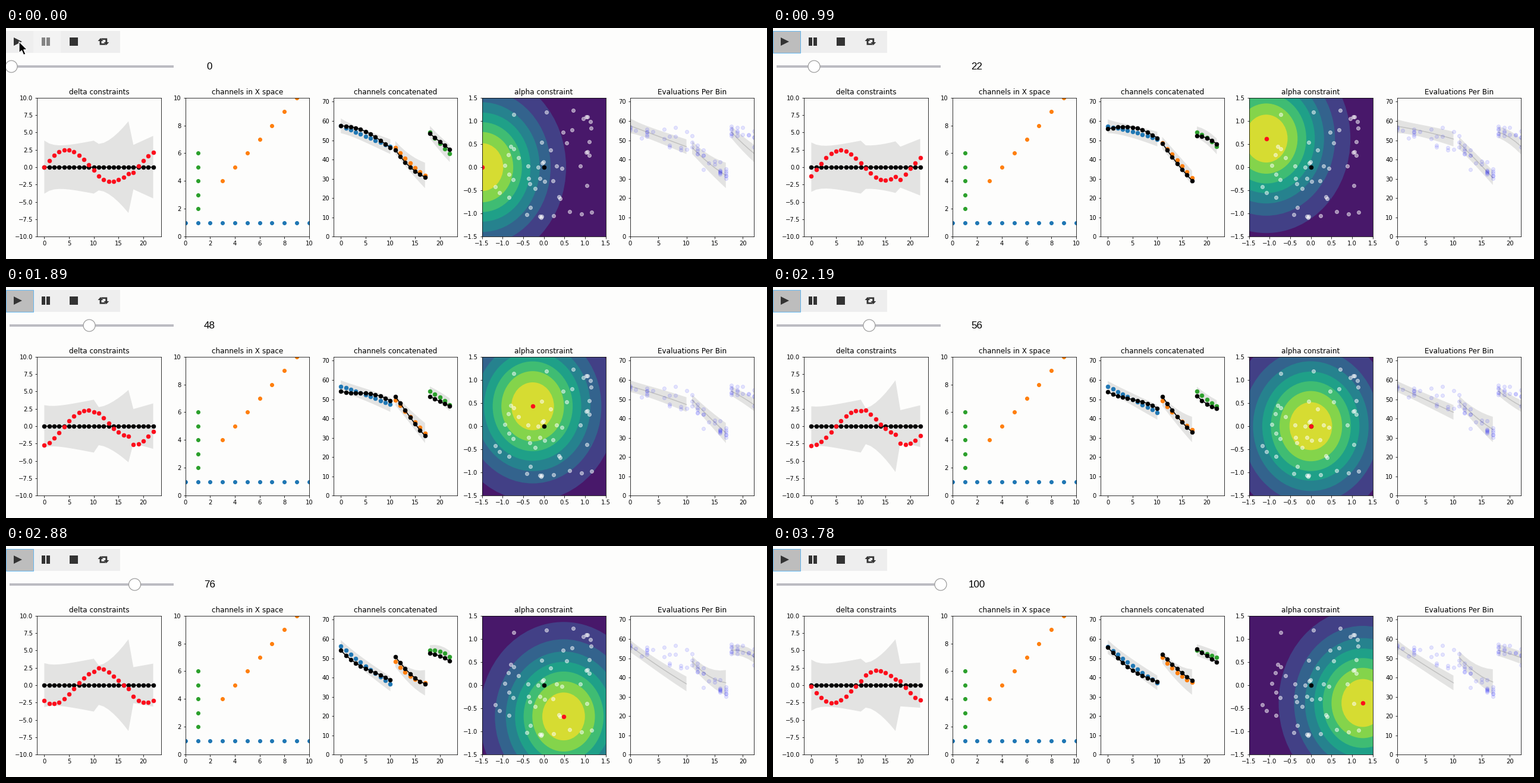
Write a matplotlib script that moves like this. It is 1280x390 px and loops after 3810 ms.

```python
import numpy as np
import matplotlib.pyplot as plt
from matplotlib.animation import FuncAnimation
from matplotlib.patches import Circle, FancyBboxPatch, Polygon, Rectangle

W, H, DPI = 1280, 390, 72
FRAMES, STEP_MS = 127, 30
PAGE, INK, RED = "#fdfdfc", "#333333", "#fc0d1b"
PRESS_FRAME = 2
TIP_START, TIP_END = 9, 25

BINS = np.arange(23)
CHANNELS = [slice(0, 11), slice(11, 18), slice(18, 23)]
COLORS = ["tab:blue", "tab:orange", "tab:green"]

# Playback timing: slider readout and path position at a few frames.
KEY_FRAMES = [0, 4, 14, 17, 33, 53, 73, 96, 126]
KEY_VALUES = [0, 0, 7.7, 10, 22, 40, 56, 76, 100]
KEY_PATH = [0, 0, 0, .02, .14, .32, .50, .66, .92]


def path_point(t):
    return -1.5 + 3 * t, .8 * np.sin(2 * np.pi * t)


def channel_means(a, b):
    """Each channel is a line from start to end with a parabolic bend."""
    lines = [(56.6 - .6 * a, 43.2 - 2.3 * a + 8 * b, .8 * b),
             (49.1 + 1.9 * a + 2.5 * b, 34.3 + 1.7 * a - 3.2 * b, 1.8 * b - .9),
             (54.2, 46.5 + 2.2 * a + 7 * b * b, 3.5 * b * b - .4)]
    means = []
    for (start, end, bend), part in zip(lines, CHANNELS):
        u = np.linspace(0, 1, len(BINS[part]))
        means.append(start + (end - start) * u + 4 * bend * u * (1 - u))
    return np.concatenate(means)


def channel_widths(a, b):
    """Half width of the uncertainty, widest at the end of the second channel."""
    u1, u2, u3 = (np.linspace(0, 1, len(BINS[p])) for p in CHANNELS)
    far = abs(a)
    spike = 1 - 1.9 * max(b, 0) ** 2
    return np.concatenate([
        2.4 + (.45 + .65 * far) * np.exp(-5 * u1) + 1.4 * u1,
        2.6 + .5 * far * (1 - u2) + 4 * spike * u2 ** 1.5,
        2.3 + .6 * far + (.7 - .4 * a) * u3])


def wave(t):
    """Travelling sine whose amplitude fades along each channel."""
    fade = [(2.8, 2.2), (2.5, 1.6), (2.7, 2.4)]
    amp = [np.linspace(*ends, len(BINS[p])) for ends, p in zip(fade, CHANNELS)]
    return np.concatenate(amp) * np.sin((BINS - 10 * t) / 3)


def random_evaluations(rng):
    """Noisy values around a falling line for each group of bins."""
    points = []
    for first, last, count, top, slope, spread in [
            (0, 4, 11, 56, -1, 2), (6, 10, 11, 48, -.8, 4.5),
            (11, 17, 28, 47.5, -2.6, 2.5), (18, 22, 18, 55, -.7, 2)]:
        bins = rng.integers(first, last + 1, count)
        noise = rng.normal(0, spread, count)
        points.append(np.c_[bins, top + slope * (bins - first) + noise])
    return np.concatenate(points)


def outline(x, low, high):
    return np.column_stack([np.r_[x, x[::-1]], np.r_[low, high[::-1]]])


fig = plt.figure(figsize=(W / DPI, H / DPI), dpi=DPI, facecolor=PAGE)
rng = np.random.default_rng(4)


def panel(k, title, xlim, ylim, xticks, yticks):
    left, top, bottom = 52.3 + 249.4 * k, 117.6, 352.2
    ax = fig.add_axes([left / W, 1 - bottom / H, 208.2 / W, (bottom - top) / H],
                      facecolor=PAGE)
    ax.set(xlim=xlim, ylim=ylim, xticks=xticks, yticks=yticks)
    ax.set_title(title, fontsize=12)
    ax.tick_params(labelsize=10)
    return ax


def add_band(ax):
    return ax.add_patch(Polygon([(0, 0), (0, 0)], fc="black", alpha=.1, lw=0))


def add_dots(ax, color, style="o"):
    return ax.plot([], [], style, color=color, ms=6.5, lw=1.5)[0]


fives, tens = range(0, 21, 5), range(0, 71, 10)
halves = np.arange(-1.5, 1.6, .5)
ax_delta = panel(0, "delta constraints", (-1.45, 23.55), (-10, 10),
                 fives, np.arange(-10, 10.1, 2.5))
ax_space = panel(1, "channels in X space", (0, 10), (0, 10),
                 range(0, 11, 2), range(0, 11, 2))
ax_cat = panel(2, "channels concatenated", (-1.45, 23.55), (0, 72.1), fives, tens)
ax_alpha = panel(3, "alpha constraint", (-1.5, 1.5), (-1.5, 1.5), halves, halves)
ax_eval = panel(4, "Evaluations Per Bin", (0, 22), (0, 72.1), fives, tens)

delta_band = add_band(ax_delta)
add_dots(ax_delta, "black", "o-").set_data(BINS, 0 * BINS)
delta_dots = add_dots(ax_delta, RED)

ax_space.scatter(range(11), [1] * 11, color=COLORS[0])
ax_space.scatter(range(3, 10), range(4, 11), color=COLORS[1])
ax_space.scatter([1] * 5, range(2, 7), color=COLORS[2])

cat_bands = [add_band(ax_cat) for _ in CHANNELS]
cat_dots = [add_dots(ax_cat, c) for c in COLORS]
cat_lines = [add_dots(ax_cat, "black", "o-") for _ in CHANNELS]

# Filled contours of a unit Gaussian are discs around its centre.
shades = list(plt.get_cmap("viridis")((np.arange(8) + .5) / 8))
shades[-1] = "#d6dc32"
ax_alpha.set_facecolor(shades[0])
rings = [ax_alpha.add_patch(Circle((0, 0), np.sqrt(-2 * np.log(k / 8)),
                                   fc=shades[k], lw=0))
         for k in range(1, 8)]
ax_alpha.scatter(rng.uniform(-1.28, 1.2, 52), rng.uniform(-1.25, 1.3, 52),
                 color="white", alpha=.5, zorder=2)
add_dots(ax_alpha, "black").set_data([0], [0])
alpha_dot = add_dots(ax_alpha, RED)

eval_bands = [add_band(ax_eval) for _ in CHANNELS]
eval_lines = [ax_eval.plot([], [], color="black", alpha=.15, lw=1.5)[0]
              for _ in CHANNELS]
ax_eval.scatter(*random_evaluations(rng).T, color="blue", alpha=.1)

# Player controls, drawn in pixel coordinates from the top left.
ui = fig.add_axes([0, 0, 1, 1])
ui.set(xlim=(0, W), ylim=(H, 0))
ui.axis("off")


def box(x, y, w, h, color, **kw):
    return ui.add_patch(Rectangle((x, y), w, h, fc=color, **{"lw": 0, **kw}))


def shape(points, color=INK, **kw):
    return ui.add_patch(Polygon(points, fc=color, **{"lw": 0, **kw}))


box(0, 5, 192, 37, "#eeeeee")
pause_back = box(46, 5, 46, 37, "#f3f3f3")
pressed = box(.3, 5, 45.5, 37, "#bdbdbd", ec="#66b8f0", lw=1)
shape([(13, 16), (13, 30), (27, 23)])
pause_bars = [box(x, 16, 5.6, 13.5, INK) for x in (60, 68.4)]
box(107.4, 15.8, 13.8, 13.8, INK)

# The loop icon is one bent arrow and its half-turn copy.
bent = np.array([(159, 17), (163.5, 22), (160.5, 22), (160.5, 26), (166, 26),
                 (168, 28.6), (157.6, 28.6), (157.6, 22), (154.5, 22)])
shape(bent)
shape(np.array([327.8, 46]) - bent)

box(6, 62.6, 276, 4.6, "#bcbcc2")
knob = ui.add_patch(Circle((9, 65), 10, fc="white", ec="#9a9a9a", lw=1.2))
readout = ui.text(342.5, 70.5, "", family="Liberation Sans", fontsize=17, ha="center")

tip = [ui.add_patch(FancyBboxPatch((-8 + d, 48.5 + d), 201, 26,
                                   boxstyle="round,pad=0,rounding_size=2",
                                   fc=fc, ec=ec, lw=.8))
       for d, fc, ec in ((1.5, "#dddddd", "#dddddd"), (0, "#eeeeee", "#cccccc"))]
tip.append(ui.text(186, 67, "output; double click to hide", ha="right",
                   family="Liberation Sans", fontsize=15.7))

ARROW = np.array([(0, 0), (0, 19), (4.4, 15), (7.6, 22.5), (11, 21),
                  (7.8, 13.8), (13.5, 13.5)])
cursor = shape(ARROW, "black", ec="white", lw=1.3)


def draw_controls(i):
    playing = i >= PRESS_FRAME
    pressed.set_visible(playing)
    pause_back.set_visible(not playing)
    for bar in pause_bars:
        bar.set_facecolor(INK if playing else "#848484")
    value = int(round(np.interp(i, KEY_FRAMES, KEY_VALUES)))
    knob.center = (9 + 2.73 * value, 65)
    readout.set_text(str(value))
    for part in tip:
        part.set_visible(TIP_START <= i < TIP_END)
    away = np.clip((i - 4) / 6, 0, 1) ** 2
    cursor.set_xy(ARROW + (22 - 45 * away, 23 + 70 * away))


def update(i):
    draw_controls(i)
    t = round(np.interp(i, KEY_FRAMES, KEY_PATH), 2)
    a, b = path_point(t)
    mean, width, delta = channel_means(a, b), channel_widths(a, b), wave(t)

    delta_band.set_xy(outline(BINS, -width, width))
    delta_dots.set_data(BINS, delta)
    for k, part in enumerate(CHANNELS):
        x, m, w = BINS[part], mean[part], width[part]
        edge = outline(x, m - w, m + w)
        cat_bands[k].set_xy(edge)
        eval_bands[k].set_xy(edge)
        cat_dots[k].set_data(x, m)
        cat_lines[k].set_data(x, m + delta[part])
        eval_lines[k].set_data(x, m)

    for ring in rings:
        ring.center = (a, b)
    alpha_dot.set_data([a], [b])
    return []


anim = FuncAnimation(fig, update, frames=FRAMES, interval=STEP_MS,
                     init_func=lambda: update(0), repeat=True, repeat_delay=0)
plt.show()
```
